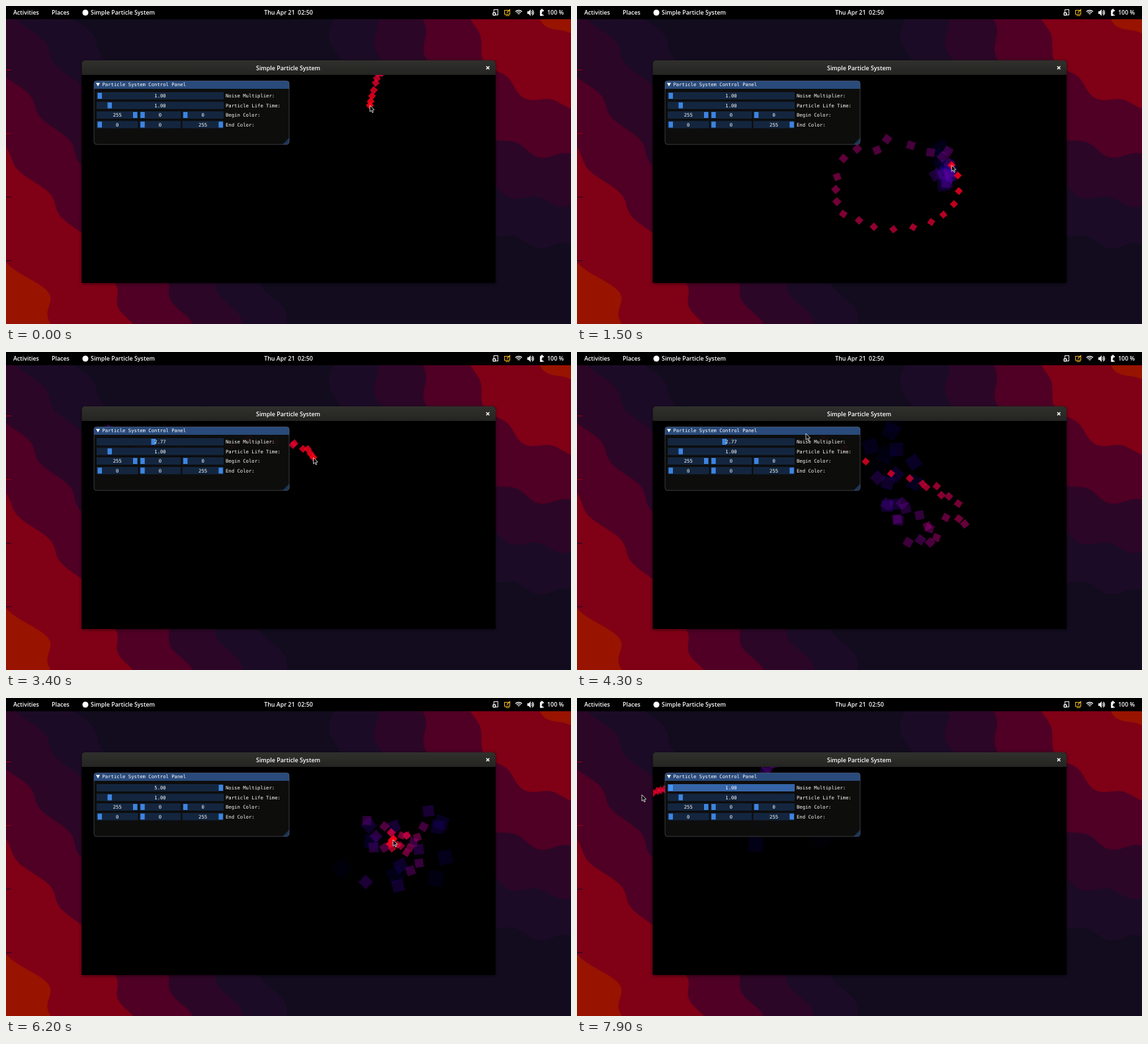
Recreate the animation shown at these times as an HTML page with a canvas. Size 854 px wide and 480 px high, loop 8000 ms.

```html
<!DOCTYPE html>
<html>
<head>
<meta charset="utf-8">
<style>
html, body { margin: 0; height: 100%; overflow: hidden; background: #000; }
canvas { display: block; }
</style>
</head>
<body>
<canvas id="stage" width="854" height="480"></canvas>
<script>
const c = document.getElementById('stage').getContext('2d');
const LOOP = 8000, STEP = 25, LIFE = 1000, TAU = Math.PI * 2;
const UI = '600 8.9px "Open Sans", "Noto Sans", sans-serif';
const MONO = '7.25px "DejaVu Sans Mono", monospace';

// Key points along an elliptic stroke, angles in turns
function swirl(t0, t1, cx, cy, rx, ry, from, to) {
  return Array.from({ length: 11 }, (_, i) => {
    const u = i / 10, a = TAU * (from + (to - from) * u);
    return [t0 + (t1 - t0) * u, cx + rx * Math.cos(a), cy + ry * Math.sin(a)];
  });
}

// Pointer path: time, x, y
const path = [
  [-1000, 610, 30], [-150, 564, 105], [0, 550, 150], [450, 560, 210], [850, 552, 265],
  ...swirl(1000, 1500, 483, 272, 95, 66, -.12, -1.08),
  [1720, 460, 242], [1860, 418, 214], [2400, 203, 145], [2550, 142, 135],
  [3000, 223, 135], [3300, 440, 140],
  ...swirl(3700, 4165, 525, 241, 47, 40, .5, -.28),
  [4300, 346, 123], [4500, 223, 135], [4850, 345, 135], [5100, 551, 144],
  [5350, 590, 225], [6200, 585, 214], [6600, 555, 230], [7000, 295, 190],
  [7150, 325, 135], [7650, 160, 136], [7900, 98, 146]
];
// Times when the noise slider is held
const drags = [[2550, 3000], [4500, 4850], [7150, 8000]];

const clamp = (v, lo, hi) => Math.max(lo, Math.min(hi, v));

function slope(i, k) {
  const a = path[Math.max(0, i - 1)], b = path[Math.min(path.length - 1, i + 1)];
  return (b[k] - a[k]) / (b[0] - a[0]);
}

function pointer(t) {
  t = clamp(t, -1000, 7900);
  let i = 0;
  while (i < path.length - 2 && path[i + 1][0] <= t) i++;
  const a = path[i], b = path[i + 1], d = b[0] - a[0], u = (t - a[0]) / d;
  return [1, 2].map(k =>
    a[k] + (b[k] - a[k]) * u * u * (3 - 2 * u) +
    d * u * (1 - u) * ((1 - u) * slope(i, k) - u * slope(i + 1, k)));
}

function noiseAt(t) {
  const last = drags.filter(d => t >= d[0]).pop();
  return last ? 1 + 4 * clamp((pointer(Math.min(t, last[1]))[0] - 142) / 183, 0, 1) : 1;
}

function random(n) {
  const s = Math.sin(n * 12.9898 + 4.137) * 43758.5453;
  return s - Math.floor(s);
}

function box(x, y, w, h, color, r = 0) {
  c.fillStyle = color;
  c.beginPath();
  c.roundRect(x, y, w, h, r);
  c.fill();
}

function text(s, x, y, font, align = 'left') {
  c.font = font;
  c.textAlign = align;
  c.fillStyle = '#fff';
  c.fillText(s, x, y);
}

function line(color, width, ...pts) {
  c.strokeStyle = color;
  c.lineWidth = width;
  c.beginPath();
  pts.forEach(p => c.lineTo(...p));
  c.stroke();
}

function polygon(color, ...pts) {
  c.fillStyle = color;
  c.beginPath();
  pts.forEach(p => c.lineTo(...p));
  c.fill();
}

function arc(x, y, r, from, to) {
  c.beginPath();
  c.arc(x, y, r, from, to);
  c.stroke();
}

// Scalloped bands around the lower left and upper right corners
function wallpaper() {
  box(0, 0, 854, 480, '#120c1e');
  ['#1c0b26', '#2c0627', '#4f0024', '#800016', '#981300'].forEach((color, i) => {
    const k = 4 - i, grow = k ** .8;
    const left = [[-60, 480]], right = [[854, 0]];
    const reach = 70 + 118 * grow, height = reach / .73, radius = 45 + 105 * grow;
    for (let y = -20; y <= 480; y += 4) {
      const up = 480 - y;
      left.push([reach - .73 * up + 22 * Math.sin(Math.PI * Math.min(1, up / height)) +
        7 * Math.sin(y / 11 + k), y]);
    }
    left.splice(1, 0, [-60, -20]);
    for (let a = 0; a <= 1.001; a += .02) {
      const r = radius + 6 * Math.sin(a * radius / 8 + k), angle = a * Math.PI / 2;
      right.push([854 - r * Math.cos(angle), r * Math.sin(angle)]);
    }
    polygon(color, ...left);
    polygon(color, ...right);
  });
  for (let i = 0; i < 4; i++) box(0, 96 * (i + 1), 8, 1, i < 2 ? '#a00010' : '#180a20');
}

function topBar() {
  box(0, 0, 854, 20, '#000');
  text('Activities', 11, 13, UI);
  text('Places', 69, 13, UI);
  text('Simple Particle System', 128, 13, UI);
  text('Thu Apr 21  02:50', 427, 13, UI, 'center');
  text('100 %', 818, 13, UI);
  box(115.5, 5.5, 9, 9, '#fff', 4.5);

  c.strokeStyle = '#eee';
  c.lineWidth = 1;
  c.strokeRect(737.5, 5.5, 6, 8);
  box(735.5, 9.5, 5, 5, '#eee', 1);
  box(737, 11, 2, 2, '#000');
  c.strokeStyle = '#f0b820';
  c.strokeRect(753.5, 6.5, 8, 6);
  line('#f0b820', 1.2, [757, 10], [762, 5]);
  box(755, 14, 6, 1, '#f0b820');
  c.strokeStyle = '#eee';
  c.lineWidth = 1.4;
  for (const r of [2, 4.5, 7]) arc(775, 13.5, r, -2.35, -.79);
  for (const r of [2.5, 4.5]) arc(793, 10, r, -1, 1);
  polygon('#eee', [788, 8], [790, 8], [793, 5], [793, 15], [790, 12], [788, 12]);
  box(807, 6, 6, 9, '#eee', 1);
  box(808.5, 4.5, 3, 2, '#eee');
  polygon('#000', [811, 8], [814, 8], [812.5, 10.5], [815, 10.5], [811, 15], [811.5, 12], [809.5, 12]);
}

function particles(t) {
  c.save();
  c.beginPath();
  c.rect(115, 104, 625, 314);
  c.clip();
  for (let n = Math.ceil((t - LIFE) / STEP); n * STEP <= t; n++) {
    const born = n * STEP, age = (t - born) / LIFE;
    const [x, y] = pointer(born), drift = 36 * noiseAt(born) * age;
    const size = 8.5 + 17 * age * age;
    c.save();
    c.translate(x + (random(n) - .5) * drift, y + (random(n + 500) - .5) * drift);
    c.rotate(.78 + (random(n + 900) - .5) * 3 * age);
    c.fillStyle = `rgba(${255 * (1 - age)},0,${20 + 235 * age},${.88 * (1 - age)})`;
    c.fillRect(-size / 2, -size / 2, size, size);
    c.restore();
  }
  c.restore();
}

// state: 0 idle, 1 hovered, 2 held
function slider(x, y, w, f, label, state) {
  box(x, y, w, 11, ['#14263f', '#22446f', '#3565a8'][state]);
  box(x + 1.5 + f * (w - 9), y + 1, 6.5, 9, state === 2 ? '#4296fa' : '#3d85e0');
  text(label, x + w / 2, y + 8.2, MONO, 'center');
}

function panel(t) {
  const [mx, my] = pointer(t), noise = noiseAt(t);
  const held = drags.some(([from, to]) => t >= from && t < to);
  const control = (x, row, w, f, label, grabbed) => {
    const y = 130 + row * 14.5;
    const over = !held && mx >= x && mx < x + w && my >= y && my < y + 11;
    slider(x, y, w, f, label, grabbed ? 2 : over ? 1 : 0);
  };

  box(133, 113, 295, 96, 'rgba(14,14,13,.95)', 4);
  box(133, 113, 295, 12, '#294a7a', [4, 4, 0, 0]);
  polygon('#1b3455', [428, 199], [428, 206], [425, 209], [418, 209]);
  c.strokeStyle = 'rgba(110,110,128,.5)';
  c.lineWidth = 1;
  c.beginPath();
  c.roundRect(133, 113, 295, 96, 4);
  c.stroke();
  polygon('#fff', [136, 116], [142, 116], [139, 121.5]);
  text('Particle System Control Panel', 145.5, 121.3, MONO);

  control(137, 0, 192, (noise - 1) / 4, noise.toFixed(2), held);
  control(137, 1, 192, .082, '1.00');
  [[255, 0, 0], [0, 0, 255]].forEach((rgb, row) => rgb.forEach((v, i) =>
    control(137 + i * 64.7, row + 2, 62.5, v / 255, String(v))));
  ['Noise Multiplier:', 'Particle Life Time:', 'Begin Color:', 'End Color:']
    .forEach((s, i) => text(s, 332, 138.2 + i * 14.5, MONO));
}

function appWindow(t) {
  c.save();
  c.shadowColor = 'rgba(0,0,0,.6)';
  c.shadowBlur = 5;
  c.shadowOffsetY = 1;
  box(114.5, 82, 625.5, 336, '#000', [5, 5, 0, 0]);
  c.restore();
  const shade = c.createLinearGradient(0, 82, 0, 104);
  shade.addColorStop(0, '#30302d');
  shade.addColorStop(1, '#242422');
  box(114.5, 82, 625.5, 22, shade, [5, 5, 0, 0]);
  text('Simple Particle System', 426.5, 97, UI, 'center');
  line('#fff', 1.4, [726, 91], [730.5, 95.5]);
  line('#fff', 1.4, [730.5, 91], [726, 95.5]);
  particles(t);
  panel(t);
}

function cursor(t) {
  c.save();
  c.translate(...pointer(t));
  polygon('#000', [0, 0], [0, 9.5], [2.2, 7.6], [3.8, 11], [5.2, 10.3], [3.7, 7], [6.6, 6.8]);
  c.closePath();
  c.strokeStyle = '#ddd';
  c.lineWidth = .9;
  c.stroke();
  c.restore();
}

function draw() {
  const t = Math.floor(performance.now() % LOOP / 100) * 100;
  wallpaper();
  topBar();
  appWindow(t);
  cursor(t);
  requestAnimationFrame(draw);
}
draw();
</script>
</body>
</html>
```
